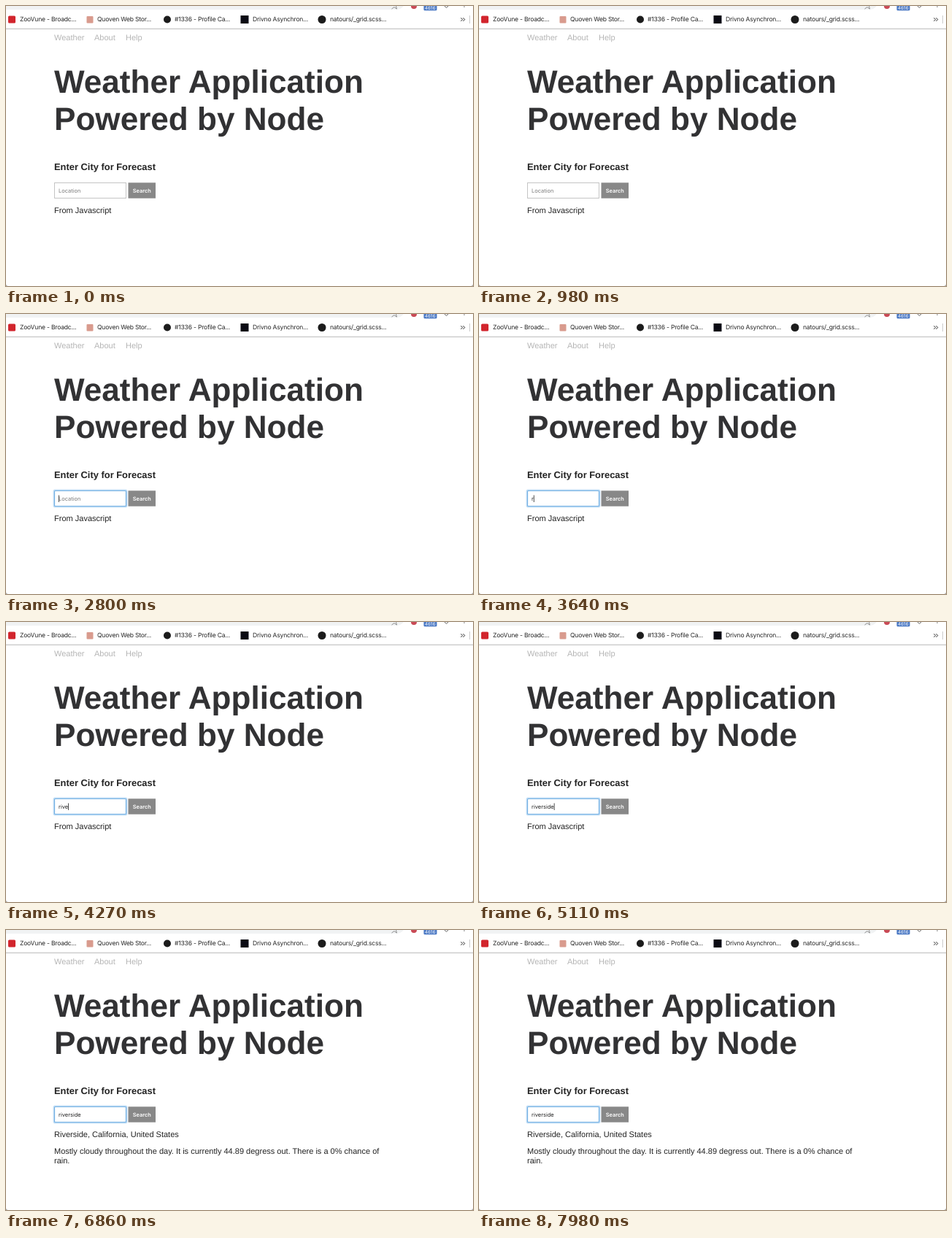
Animation, 640 px wide and 384 px high, one loop 8 s. Source, as an HTML page:

```html
<!DOCTYPE html>
<html lang="en">
<head>
<meta charset="utf-8">
<title>Weather Application</title>
<style>
  html, body { margin: 0; width: 100%; height: 100%; overflow: hidden; background: #fff; }
  svg { display: block; width: 640px; height: 384px; }
  text { font: 11.025px "Liberation Sans", Arial, sans-serif; fill: #222; text-rendering: geometricPrecision; }
  .bookmarks text { font: 8.55px Inter, sans-serif; letter-spacing: -.2px; fill: #262626; }
  .nav text { fill: #b5b5b5; }
  .title text { font-size: 44.1px; font-weight: bold; fill: #323234; }
  .label { font-size: 12.9px; font-weight: bold; }
  .field text { font: 7.5px Inter, sans-serif; }
  .field .button { font-size: 7.4px; font-weight: 600; fill: #fff; }
  .badge { font: 6.4px Inter, sans-serif; fill: #fff; }
</style>
</head>
<body>
<svg viewBox="0 0 640 384">
  <rect width="640" height="384" fill="#fff"/>

  <g class="toolbar">
    <rect x="-20" y="-20" width="566" height="25" rx="10" fill="#f1f3f4"/>
    <path d="M528.5 4L532 1.5L535.5 4L534.5 0" fill="none" stroke="#777" stroke-width=".8"/>
    <circle cx="559" cy="0" r="4" fill="#c94a55"/>
    <rect x="572.5" y="-3" width="18" height="9.2" rx="1.5" fill="#4a78c4"/>
    <text class="badge" x="574" y="4.5">4616</text>
    <path d="M601 0L603.5 2.5L606 0" fill="none" stroke="#666"/>
    <circle cx="628" cy="1" r=".8" fill="#777"/>
  </g>

  <g class="bookmarks">
    <rect x="3" y="13.5" width="10" height="10" rx="1.5" fill="#d2252d"/>
    <text x="19" y="21.4">ZooVune - Broadc...</text>
    <rect x="110.5" y="14" width="9" height="9.5" rx="1" fill="#d99b8e"/>
    <text x="125" y="21.4">Quoven Web Stor...</text>
    <circle cx="221" cy="18.5" r="5" fill="#1c1c1c"/>
    <text x="231" y="21.4">#1336 - Profile Ca...</text>
    <rect x="321.5" y="13" width="11" height="11" fill="#0b0b14"/>
    <text x="338" y="21.4">Drivno Asynchron...</text>
    <circle cx="433" cy="18.5" r="5.5" fill="#1c1c1c"/>
    <text x="444" y="21.4">natours/_grid.scss...</text>
    <path d="M623.5 16.2l2.2 2.3l-2.2 2.3M626.5 16.2l2.2 2.3l-2.2 2.3" fill="none" stroke="#222"/>
    <path d="M635.5 13V24" stroke="#ccc"/>
    <path d="M0 31.3H640" stroke="#b9b9b9"/>
  </g>

  <g class="nav">
    <text x="66" y="46.7">Weather</text>
    <text x="121" y="46.7">About</text>
    <text x="164" y="46.7">Help</text>
  </g>
  <g class="title">
    <text x="66" y="119.2">Weather Application</text>
    <text x="66" y="170.2">Powered by Node</text>
  </g>
  <text class="label" x="66" y="225.3">Enter City for Forecast</text>

  <g class="field">
    <rect x="66.5" y="242.5" width="98" height="21" fill="#fff" stroke="#c4c4c4"/>
    <g id="focus" fill="none">
      <rect x="65.7" y="241.7" width="99.6" height="22.6" rx="1.5" stroke="#c0ddf5" stroke-width="2.2"/>
      <rect x="66.5" y="242.5" width="98" height="21" rx="1" stroke="#74b0e3" stroke-width="1.2"/>
    </g>
    <text id="entry" x="72" y="256"></text>
    <rect id="caret" y="248.5" width=".8" height="9.5" fill="#222"/>
    <rect x="167.5" y="242.3" width="37.5" height="21.4" fill="#888"/>
    <text class="button" x="173.7" y="256">Search</text>
  </g>

  <text id="status" x="66" y="284"></text>
  <g id="forecast">
    <text x="66" y="307.2">Mostly cloudy throughout the day. It is currently 44.89 degress out. There is a 0% chance of</text>
    <text x="66" y="319.6">rain.</text>
  </g>
  <path d="M0 381Q0 384 3 384H0ZM640 381Q640 384 637 384H640Z" fill="#999"/>
</svg>

<script>
const LOOP = 8000, FOCUS = 2660, SUBMIT = 5390, RESULT = 6650;
const CITY = "riverside";
const keyTimes = [3570, 3780, 3990, 4200, 4340, 4480, 4620, 4760, 4900];
const caretSwitches = [FOCUS, 3150, keyTimes[0], 5740, 6230, 6720, 7210, 7700];

const [focus, entry, caret, statusLine, forecast] =
  ["focus", "entry", "caret", "status", "forecast"].map(id => document.getElementById(id));

const countPassed = (times, t) => times.filter(time => time <= t).length;
const show = (el, visible) => el.setAttribute("visibility", visible ? "visible" : "hidden");
const write = (el, text) => { if (el.textContent !== text) el.textContent = text; };

function draw(t) {
  const typed = CITY.slice(0, countPassed(keyTimes, t));
  write(entry, typed || "Location");
  entry.style.fill = typed ? "#222" : "#7d7d7d";

  show(focus, t >= FOCUS);
  show(caret, countPassed(caretSwitches, t) % 2);
  caret.setAttribute("x", 72 + (typed ? entry.getComputedTextLength() : 0));

  write(statusLine, t < SUBMIT ? "From Javascript"
    : t < RESULT ? "Loading..." : "Riverside, California, United States");
  show(forecast, t >= RESULT);
}

function tick() {
  draw(performance.now() % LOOP);
  requestAnimationFrame(tick);
}
tick();
</script>
</body>
</html>
```
